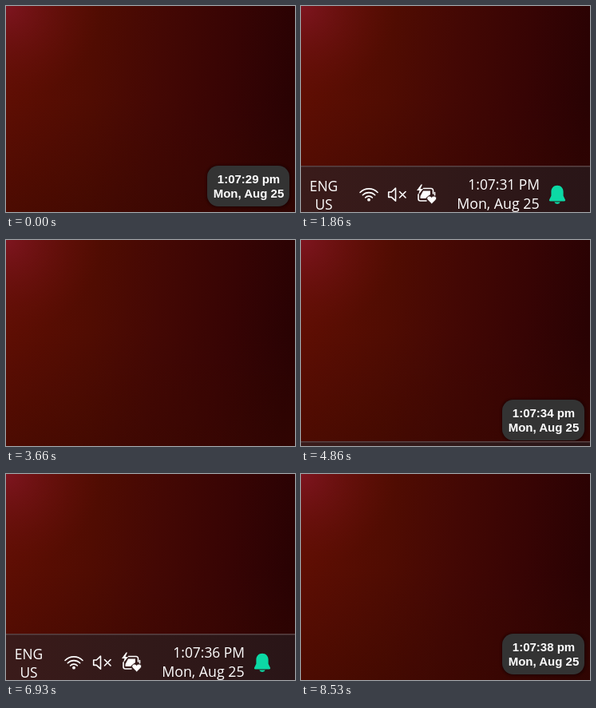
Recreate the animation shown at these times as an HTML page. Size 362x258 px, loop 9 s.

```html
<!DOCTYPE html>
<html lang="en">
<head>
<meta charset="utf-8">
<title>Taskbar clock</title>
<style>
html, body { margin: 0; width: 100%; height: 100%; overflow: hidden; background: #2a0203; }
svg { display: block; width: 362px; height: 258px; }
text { fill: #fff; }
.bar text { font-family: "Open Sans", "Noto Sans", sans-serif; font-size: 17.4px; }
.popup text { font: bold 15px "Liberation Sans", Arial, sans-serif; text-anchor: middle; }
.end { text-anchor: end; }
.mid { text-anchor: middle; }
.line { fill: none; stroke: #fff; stroke-width: 1.6; stroke-linecap: round; stroke-linejoin: round; }
</style>
</head>
<body>
<svg viewBox="0 0 362 258">
  <defs>
    <linearGradient id="wall" gradientUnits="userSpaceOnUse" x1="0" y1="90" x2="358" y2="130">
      <stop offset="0" stop-color="#5f0e03"/>
      <stop offset=".3" stop-color="#500c02"/>
      <stop offset=".52" stop-color="#440804"/>
      <stop offset=".78" stop-color="#370404"/>
      <stop offset="1" stop-color="#290203"/>
    </linearGradient>
    <radialGradient id="glow" gradientUnits="userSpaceOnUse" cx="0" cy="0" r="120">
      <stop offset="0" stop-color="#7e1520"/>
      <stop offset=".35" stop-color="#751318" stop-opacity=".65"/>
      <stop offset="1" stop-color="#650f08" stop-opacity="0"/>
    </radialGradient>
    <linearGradient id="fade" x1="0" y1="0" x2="0" y2="1">
      <stop offset=".45" stop-color="#380800" stop-opacity="0"/>
      <stop offset="1" stop-color="#380800" stop-opacity=".45"/>
    </linearGradient>
    <linearGradient id="glass">
      <stop offset="0" stop-color="#3a1b1a"/>
      <stop offset=".5" stop-color="#311919"/>
      <stop offset="1" stop-color="#291517"/>
    </linearGradient>
    <filter id="shadow" x="-10%" y="-20%" width="120%" height="140%">
      <feGaussianBlur stdDeviation="1.6"/>
    </filter>
  </defs>

  <rect width="362" height="258" fill="url(#wall)"/>
  <rect width="362" height="258" fill="url(#fade)"/>
  <rect width="362" height="258" fill="url(#glow)"/>

  <g class="popup" id="popup">
    <rect x="251.500" y="199.500" width="104.500" height="52.500" rx="14" fill="#120404" opacity=".8" filter="url(#shadow)"/>
    <rect x="252" y="200" width="103" height="51" rx="14" fill="#333"/>
    <text id="popupTime" x="304" y="222"></text>
    <text x="304" y="240">Mon, Aug 25</text>
  </g>

  <g class="bar" id="bar">
    <rect y="186" width="362" height="74" fill="url(#glass)"/>
    <rect y="186" width="362" height="1.500" fill="#594344"/>
    <text class="mid" x="28.500" y="218">ENG</text>
    <text class="mid" x="28.500" y="241">US</text>

    <g class="line">
      <path d="M74 219.500a15.500 15.500 0 0 1 22 0M77.300 222.800a10.900 10.900 0 0 1 15.400 0M80.600 226a6.200 6.200 0 0 1 8.800 0"/>
    </g>
    <circle cx="85" cy="228.700" r="1.900" fill="#fff"/>

    <g class="line">
      <path d="M109.700 219h3.600l5.200-4.800v16l-5.200-4.800h-3.600z"/>
      <path d="M123.500 218.500l7.500 7.500m0-7.500l-7.500 7.500"/>
    </g>

    <g class="line" stroke-width="1.800">
      <path d="M153.500 214.500h9.500a2.500 2.500 0 0 1 2.500 2.500v4M147 222v5.500a2.500 2.500 0 0 0 2.500 2.500h7.500M167.500 219.500v3.500"/>
    </g>
    <path d="M153 217.500h9v4.500l-6 5h-6.500v-3z" fill="#fff"/>
    <path d="M150.500 209.500l-5.500 7.500h3.500l-1.500 5.500 6-7.500h-3.500l2.500-5.500z" fill="#fff"/>
    <path d="M163.700 234l-5.300-5.200c-2.400-3.200 2.200-6.800 5.300-3.300c3.100-3.500 7.700.1 5.300 3.300z" fill="#fff" stroke="#311919" stroke-width="1"/>

    <text class="end" id="barTime" x="299" y="216"></text>
    <text class="end" x="298.700" y="240" style="font-size:17.800px">Mon, Aug 25</text>

    <g fill="#0cd9a5">
      <path d="M321 210.800c-4.600 0-7.600 3.400-7.600 7.800v5.200l-2.300 4.600c-.5 1.200 0 2 1.200 2h17.400c1.200 0 1.700-.8 1.200-2l-2.300-4.600v-5.200c0-4.400-3-7.800-7.600-7.800z"/>
      <path d="M317.300 231.500h7.400a3.800 3.200 0 0 1-7.400 0z"/>
    </g>
  </g>
</svg>

<script>
const LOOP = 9000;
const HIDDEN = 72;

// [start ms, value] steps
const slide = [
  [0, HIDDEN],
  [1860, 14], [1930, 4], [2000, 1], [2060, 0],
  [3460, 11], [3530, 42], [3600, HIDDEN],
  [4860, 66], [4930, 17], [5000, 4], [5060, 0],
  [6860, 3], [6930, 14], [7000, 42], [7060, HIDDEN]
];
const popupShown = [[0, 1], [1860, 0], [3730, 1], [4930, 0], [7260, 1]];
const ticks = [530, 1600, 2400, 3530, 4530, 5530, 6730, 7400, 8460];

const $ = id => document.getElementById(id);
const bar = $("bar"), popup = $("popup");
const barTime = $("barTime"), popupTime = $("popupTime");

function valueAt(steps, t) {
  let value = steps[0][1];
  for (const [start, v] of steps) if (t >= start) value = v;
  return value;
}

function draw(t) {
  const clock = "1:07:" + (29 + ticks.filter(at => t >= at).length);
  barTime.textContent = clock + " PM";
  popupTime.textContent = clock + " pm";
  const y = valueAt(slide, t);
  bar.setAttribute("transform", `translate(0 ${y})`);
  bar.style.visibility = y < HIDDEN ? "visible" : "hidden";
  popup.style.visibility = valueAt(popupShown, t) ? "visible" : "hidden";
}

const began = performance.now();
function loop() {
  draw((performance.now() - began) % LOOP);
  requestAnimationFrame(loop);
}
draw(0);
requestAnimationFrame(loop);
</script>
</body>
</html>
```
